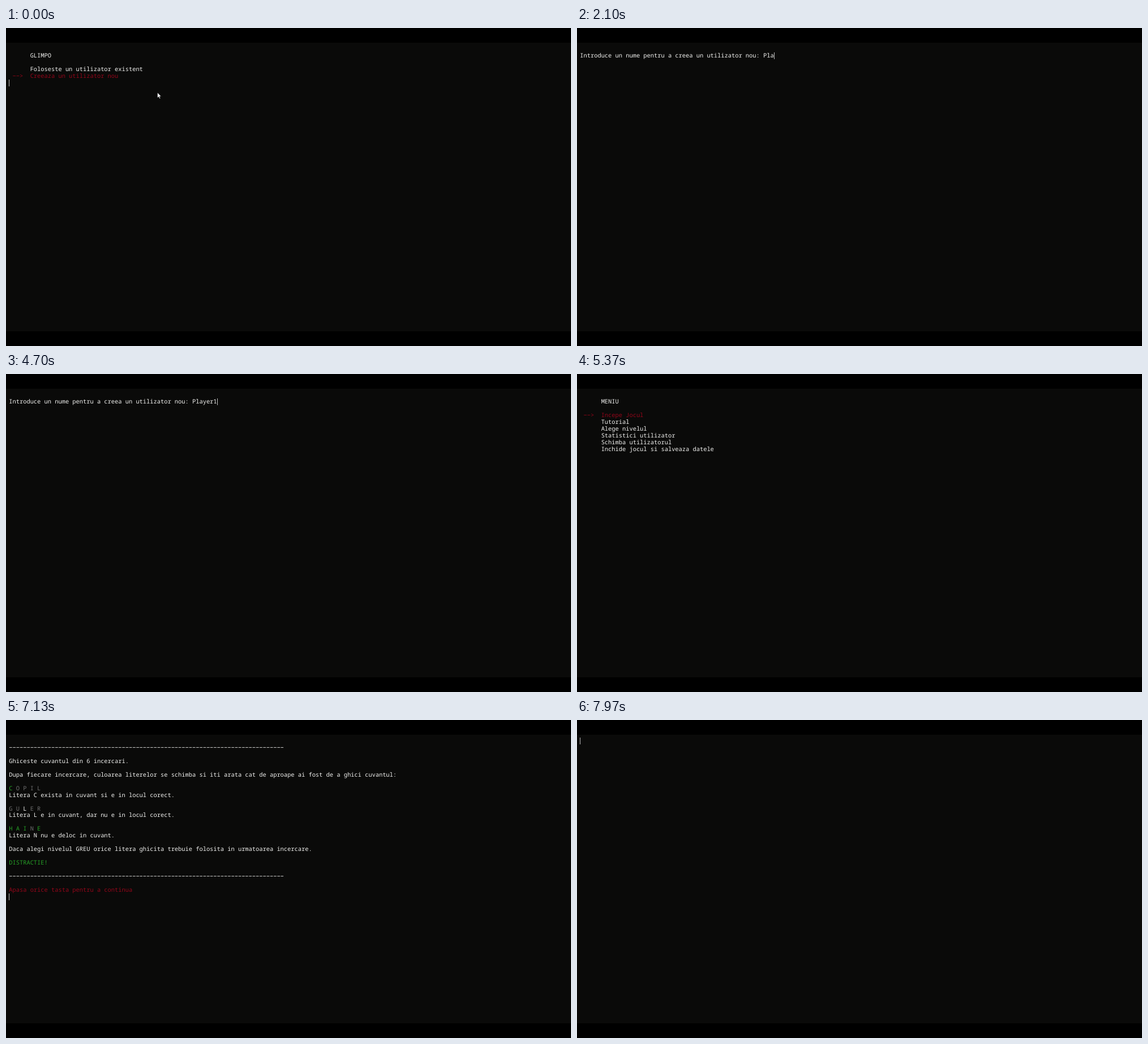
An HTML page for the animation above (8000 ms loop, 998 by 561 pixels).

```html
<!DOCTYPE html>
<html lang="ro">
<head>
<meta charset="utf-8">
<title>Terminal</title>
<style>
  html, body { margin: 0; width: 100%; height: 100%; overflow: hidden; background: #000; }
  #window { position: absolute; left: 0; top: 26px; width: 998px; height: 509px; background: #0a0a09; }
  #text {
    position: absolute; left: 5.3px; top: 32px; margin: 0;
    font: 500 10.392px/11.95px "Noto Sans Mono", "DejaVu Sans Mono", monospace;
    font-variant-ligatures: none; text-rendering: geometricPrecision;
    color: #f2f2f0; white-space: pre;
  }
  #caret { position: absolute; left: 0; top: 0; width: 1px; height: 12px; background: #bbb; }
  #pointer { position: absolute; left: 266px; top: 113px; }
  .red { color: #94061a; }
  .green { color: #26a126; }
  .gray { color: #6e6e6e; }
</style>
</head>
<body>
<div id="window"></div>
<pre id="text"></pre>
<div id="caret"></div>
<svg id="pointer" width="10" height="14">
  <path d="M1.5 1v9.3l2.2-2 1.6 3.4 1.5-.7-1.6-3.2h3z" fill="#fff" stroke="#000" stroke-width=".5"/>
</svg>
<script>
const LOOP = 8000, COL = 6.235, ROW = 11.95;
const DASH = '\u2212';
const paint = (color, text) => `<span class="${color}">${text}</span>`;
const red = s => paint('red', s), green = s => paint('green', s), gray = s => paint('gray', s);

function menu(title, items, chosen) {
  const rows = items.map((item, i) =>
    i === chosen ? red(` ${DASH}${DASH}&gt;  ${item}`) : '      ' + item);
  return ['', '      ' + title, '', ...rows].join('\n');
}

const startItems = ['Foloseste un utilizator existent', 'Creeaza un utilizator nou'];
const mainItems = ['Incepe Jocul', 'Tutorial', 'Alege nivelul', 'Statistici utilizator',
  'Schimba utilizatorul', 'Inchide jocul si salveaza datele'];
const rule = DASH.repeat(78);
const help = ['', rule, '',
  'Ghiceste cuvantul din 6 incercari.', '',
  'Dupa fiecare incercare, culoarea literelor se schimba si iti arata cat de aproape ai fost de a ghici cuvantul:', '',
  green('C') + gray(' O P I L'),
  'Litera C exista in cuvant si e in locul corect.', '',
  gray('G U ') + 'L' + gray(' E R'),
  'Litera L e in cuvant, dar nu e in locul corect.', '',
  green('H A I ') + gray('N') + green(' E'),
  'Litera N nu e deloc in cuvant.', '',
  'Daca alegi nivelul GREU orice litera ghicita trebuie folosita in urmatoarea incercare.', '',
  green('DISTRACTIE!'), '', rule, '',
  red('Apasa orice tasta pentru a continua')].join('\n');

const prompt = 'Introduce un nume pentru a creea un utilizator nou: ';
const typed = 'Player1';
const keyTimes = [1430, 1760, 2030, 2300, 2800, 3150, 3670];

// Each screen: start time, markup, caret row, caret column
const screens = [
  [0, menu('GLIMPO', startItems, 1), 5, 0],
  ...[30, ...keyTimes].map((t, n) =>
    [t, '\n' + prompt + typed.slice(0, n), 1, prompt.length + n]),
  [4900, '', 0, 0],
  [4930, menu('MENIU', mainItems, 0), 9, 0],
  [6290, menu('MENIU', mainItems, 1), 9, 0],
  [6830, '', 0, 0],
  [6860, help, 23, 0],
  [7960, '', 0, 0]
];
// Moments at which the caret starts a fresh blink
const blinkStarts = [0, 30, ...keyTimes, 6290, 6830, 7960];

const [text, caret, pointer] = ['text', 'caret', 'pointer'].map(id => document.getElementById(id));
let shown = null;

function draw(t) {
  const screen = screens.findLast(s => s[0] <= t);
  if (screen !== shown) {
    const [, markup, row, col] = shown = screen;
    text.innerHTML = markup;
    caret.style.transform = `translate(${Math.round(5 + col * COL)}px, ${Math.round(31 + row * ROW)}px)`;
  }
  const since = t - blinkStarts.findLast(b => b <= t);
  caret.style.visibility = Math.floor(since / 515) % 2 ? 'hidden' : 'visible';
  pointer.style.visibility = t < 30 ? 'visible' : 'hidden';
}

const origin = performance.now();
function tick() {
  draw((performance.now() - origin) % LOOP);
  requestAnimationFrame(tick);
}
tick();
</script>
</body>
</html>
```
